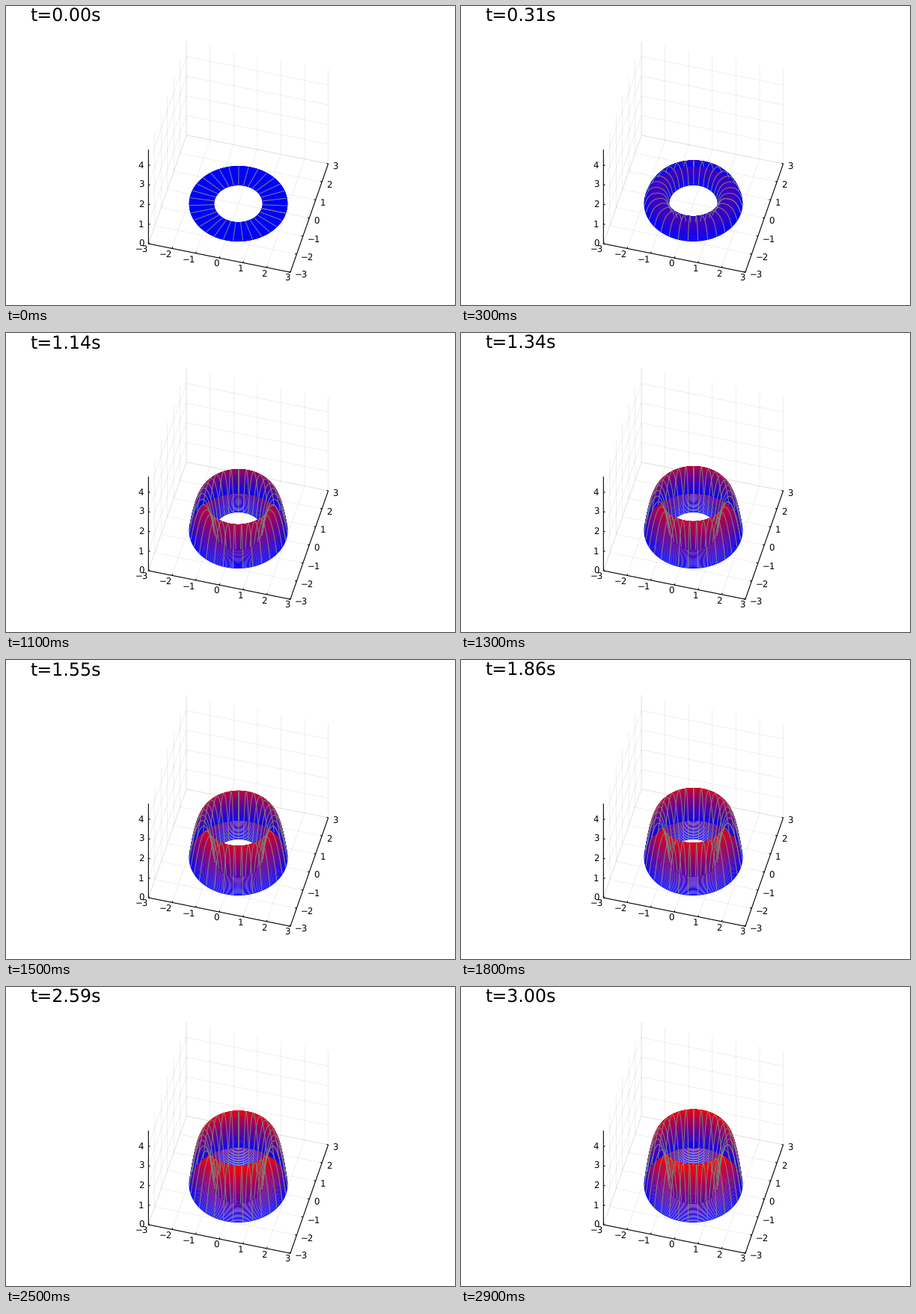
Write a matplotlib script that moves like this. It is 600 px wide and 400 px high and loops after 3000 ms.

```python
import numpy as np
import matplotlib.pyplot as plt
from matplotlib.animation import FuncAnimation
from matplotlib.collections import LineCollection

W, H, DPI = 600, 400, 100
FRAMES, T_END = 30, 3.0
PX = 72 / DPI
DIFFUSION, SOURCE = 0.1, 2.0
RINGS, SPOKES = 201, 32

plt.rcParams["font.family"] = "DejaVu Sans"
plt.rcParams["text.hinting"] = "none"


def project(x, y, z):
    """Orthographic view of the 3D box, in stage pixels."""
    sx = 310.5 + 31.6 * x + 8.45 * y
    sy = 264.5 + 6.37 * x - 24.2 * y - 26.3 * z
    return np.stack(np.broadcast_arrays(sx, sy), axis=-1)


# Heated annulus 1 < r < 2 with cold rims, solved by eigenmodes.
r = np.linspace(1, 2, RINGS)
h = r[1] - r[0]
ri = r[1:-1]
operator = DIFFUSION * (
    np.diag(np.full(RINGS - 2, -2 / h**2))
    + np.diag((1 / h**2 + 1 / (2 * h * ri))[:-1], 1)
    + np.diag((1 / h**2 - 1 / (2 * h * ri))[1:], -1)
)
rates, modes = np.linalg.eig(operator)
weights = np.linalg.solve(modes, np.full(RINGS - 2, SOURCE))


def height(t):
    u = np.zeros(RINGS)
    u[1:-1] = np.real(modes @ (weights * np.expm1(rates * t) / rates))
    return u


PEAK = height(T_END).max()
TOP = 2 * PEAK

fig = plt.figure(figsize=(W / DPI, H / DPI), dpi=DPI, facecolor="white")
ax = fig.add_axes([0, 0, 1, 1])
ax.set_xlim(0, W)
ax.set_ylim(H, 0)
ax.axis("off")


def add_lines(segments, color, width, **kw):
    lines = LineCollection(segments, colors=color, linewidths=width * PX, **kw)
    lines.set_snap(False)
    ax.add_collection(lines)
    return lines


def seg(a, b):
    return np.array([project(*a), project(*b)])


def label(pos, text, ha):
    ax.text(*pos, text, fontsize=11.7 * PX, ha=ha, va="center_baseline")


def draw_box():
    grid, ticks = [], []
    for v in range(-3, 4):
        name = str(v).replace("-", "\u2212")
        grid += [seg((v, -3, 0), (v, 3, 0)), seg((v, 3, 0), (v, 3, TOP)),
                 seg((-3, v, 0), (3, v, 0)), seg((-3, v, 0), (-3, v, TOP))]
        ticks += [seg((v, -3, 0), (v, -2.92, 0)), seg((3, v, 0), (2.93, v, 0))]
        label(project(v, -3, 0) + (0, 7.3), name, "right")
        label(project(3, v, 0) + (5.6, 3.2), name, "left")
    for v in range(5):
        grid += [seg((-3, -3, v), (-3, 3, v)), seg((-3, 3, v), (3, 3, v))]
        ticks.append(seg((-3, -3, v), (-2.93, -3, v)))
        label(project(-3, -3, v) + (-6, -0.5), str(v), "right")
    corners = np.array([(-3, -3, TOP), (-3, -3, 0), (3, -3, 0), (3, 3, 0)])
    add_lines(grid, (0, 0, 0, 0.1), 0.6, zorder=1)
    add_lines([project(*corners.T)] + ticks, "black", 1.1, zorder=2)


draw_box()
title = ax.text(32.5, 21, "", fontsize=23.7 * PX, ha="left", va="baseline")

around = np.linspace(0, 2 * np.pi, 101)
angles = np.linspace(0, 2 * np.pi, SPOKES)
rings = add_lines([], "blue", 1.0, zorder=3)
spokes = add_lines([], "gray", 1.0, zorder=4)


def sheet(theta, u):
    rr, th = np.meshgrid(r, theta, indexing="ij")
    return project(rr * np.cos(th), rr * np.sin(th), u[:, None])


def update(i):
    t = T_END * i / (FRAMES - 1)
    u = height(t)
    heat = np.clip(u / PEAK, 0, 1)
    rings.set_segments(sheet(around, u))
    rings.set_color(np.column_stack([heat, 0 * heat, 1 - heat]))
    spokes.set_segments(sheet(angles, u).swapaxes(0, 1))
    title.set_text(f"t={t:.2f}s")
    return rings, spokes, title


anim = FuncAnimation(fig, update, frames=FRAMES, interval=100,
                     repeat=True, repeat_delay=0, blit=False)
plt.show()
```
